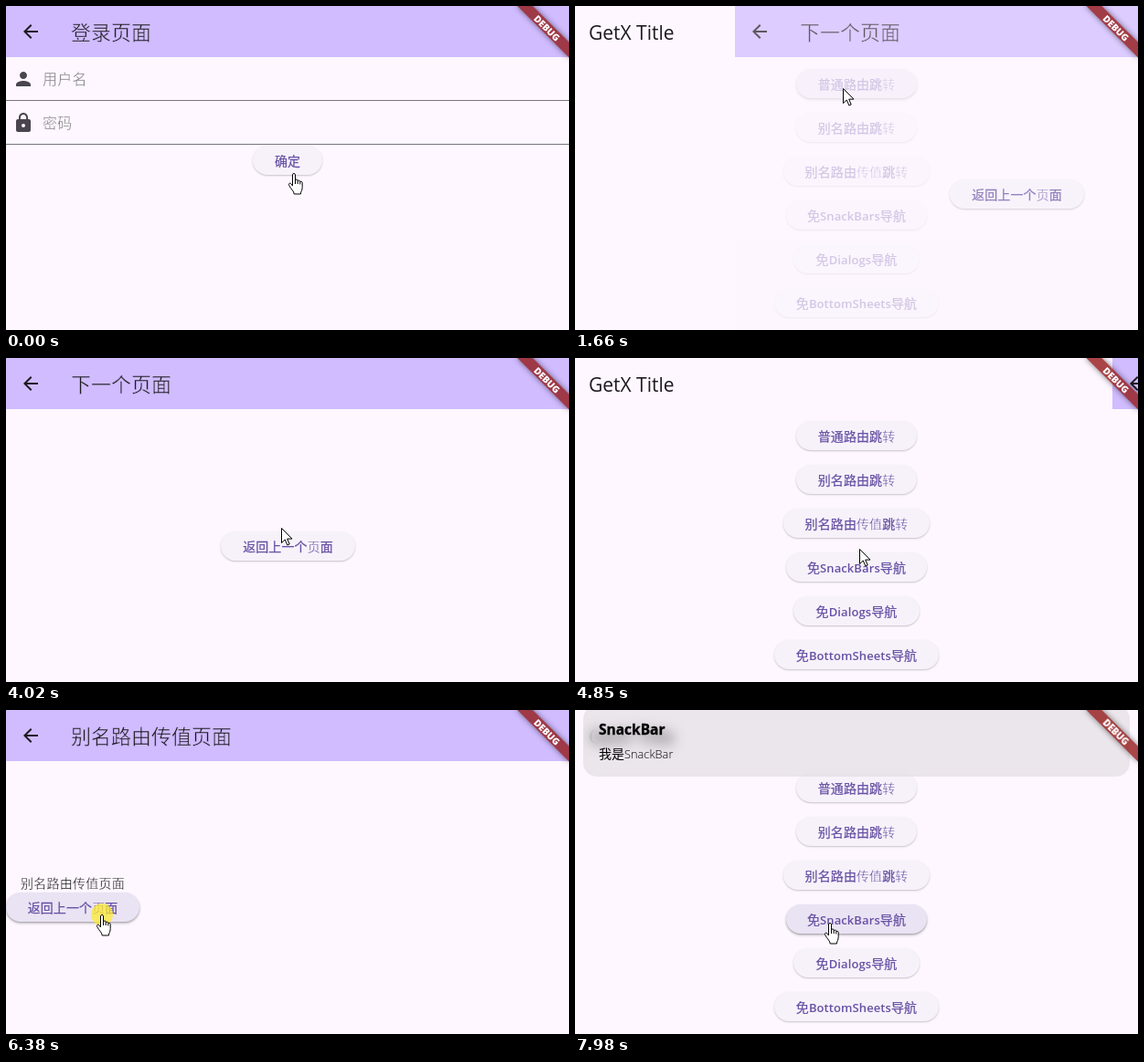
An HTML page that plays this animation: 616x355 px, repeating every 8 s.

```html
<!DOCTYPE html>
<html lang="zh-CN">
<head>
<meta charset="utf-8">
<title>Routes</title>
<style>
html, body { margin: 0; width: 100%; height: 100%; overflow: hidden; background: #fef7ff; }
#stage {
  position: relative; width: 616px; height: 355px; overflow: hidden; background: #fef7ff; color: #1d1b20;
  font: 14px "Open Sans", "Noto Sans CJK SC", "Noto Sans CJK", sans-serif; white-space: nowrap;
}
#stage div, #stage svg { position: absolute; }
.page { left: 0; top: 0; width: 616px; height: 355px; background: #fef7ff; }
.bar { left: 0; top: 0; width: 616px; height: 56px; background: #d0bcff; }
/* A stroke in the background colour thins the glyphs. */
.title { left: 71px; top: 0; font-size: 22px; line-height: 56px; font-weight: 300; -webkit-text-stroke: .5px #d0bcff; }
.home { left: 15px; top: 1px; font-size: 21px; font-weight: 400; -webkit-text-stroke: 0; }
.note { left: 16px; top: 180px; line-height: 20px; letter-spacing: .25px; -webkit-text-stroke: .3px #fef7ff; }
.ring { left: 0; top: 0; width: 56px; height: 56px; border-radius: 50%; background: rgba(29, 27, 32, .14); opacity: 0; }
.btn {
  height: 32px; line-height: 33px; border-radius: 16px; text-align: center; letter-spacing: .1px;
  color: #6750a4; background: #f7f2fa; box-shadow: 0 1px 2px rgba(0, 0, 0, .22);
  -webkit-text-stroke: .25px;
}
.btn .glow {
  inset: 0; border-radius: 16px; opacity: 0; background: rgba(103, 80, 164, .09);
  box-shadow: 0 2px 3px rgba(0, 0, 0, .18);
}
.btn b { font-weight: 600; font-size: 13px; -webkit-text-stroke: 0; }
.btn i { font-style: normal; -webkit-text-stroke: .3px #f7f2fa; }
.hint { left: 40px; font-size: 16px; line-height: 48px; letter-spacing: .3px; color: #8a858e; -webkit-text-stroke: .3px #fef7ff; }
.line { left: 0; width: 616px; height: 1px; background: #79747e; }
#snack {
  left: 9px; width: 598px; height: 78px; border-radius: 15px;
  background: rgba(158, 158, 158, .2); backdrop-filter: blur(7px);
}
#snack div { left: 17px; line-height: 20px; color: #000; }
#corner { left: 616px; top: 0; transform-origin: 0 0; transform: rotate(45deg); }
#corner div {
  left: -40px; top: 28px; width: 80px; height: 12px; text-align: center;
  font: 800 10.2px/12px "Open Sans", sans-serif; color: #fff;
  background: rgba(146, 22, 22, .79); box-shadow: 0 0 6px rgba(0, 0, 0, .5);
}
#halo { width: 24px; height: 24px; margin: -12px; border-radius: 50%; background: rgba(255, 236, 40, .72); }
#arrow, #hand { overflow: visible; fill: #fff; stroke: #000; stroke-linejoin: round; }
</style>
</head>
<body>
<div id="stage"></div>
<script>
const stage = document.getElementById('stage');
const LOOP = 8000, W = 616, SLIDE = 300;

function add(parent, cls, html = '', css = '') {
  const el = document.createElement('div');
  el.className = cls;
  el.innerHTML = html;
  el.style.cssText = css;
  return parent.appendChild(el);
}

const icon = (d, x, y, fill) =>
  `<svg width="24" height="24" style="left:${x}px;top:${y}px" fill="${fill}"><path d="${d}"/></svg>`;

// Returns the hover layer of the new button.
function button(parent, text, x, y, w) {
  const label = text.replace(/[A-Za-z]+/g, '<b>$&</b>').replace(/[转传值页]/g, '<i>$&</i>');
  const el = add(parent, 'btn', label, `left:${x}px;top:${y}px;width:${w}px`);
  return add(el, 'glow');
}

function page(title) {
  const el = add(stage, 'page');
  add(el, 'bar');
  const ring = add(el, 'ring');
  el.insertAdjacentHTML('beforeend',
    icon('M20 11H7.83l5.59-5.59L12 4l-8 8 8 8 1.41-1.41L7.83 13H20v-2z', 15, 16, '#1d1b20'));
  add(el, 'title', title);
  return { el, ring };
}

add(stage, 'title home', 'GetX Title');
const menu = [
  ['普通路由跳转', 242, 132], ['别名路由跳转', 242, 132], ['别名路由传值跳转', 228, 160],
  ['免SnackBars导航', 231, 154], ['免Dialogs导航', 239, 138], ['免BottomSheets导航', 218, 180]
].map(([text, x, w], i) => button(stage, text, x, 69 + 48 * i, w));

const next = page('下一个页面');
const nextBack = button(next.el, '返回上一个页面', 235, 190, 147);

const args = page('别名路由传值页面');
add(args.el, 'note', '别名路由传值页面');
const argsBack = button(args.el, '返回上一个页面', 0, 200, 146);

const login = page('登录页面');
login.el.insertAdjacentHTML('beforeend',
  icon('M12 12c2.21 0 4-1.79 4-4s-1.79-4-4-4-4 1.79-4 4 1.79 4 4 4zm0 2c-2.67 0-8 1.34-8 4v2h16v-2c0-2.66-5.33-4-8-4z', 7, 68, '#49454f') +
  icon('M18 8h-1V6c0-2.76-2.24-5-5-5S7 3.24 7 6v2H6c-1.1 0-2 .9-2 2v10c0 1.1.9 2 2 2h12c1.1 0 2-.9 2-2V10c0-1.1-.9-2-2-2zm-6 9c-1.1 0-2-.9-2-2s.9-2 2-2 2 .9 2 2-.9 2-2 2zm3.1-9H8.9V6c0-1.71 1.39-3.1 3.1-3.1s3.1 1.39 3.1 3.1v2z', 7, 116, '#49454f'));
['用户名', '密码'].forEach((text, i) => {
  add(login.el, 'hint', text, `top:${56 + 48 * i}px`);
  add(login.el, 'line', '', `top:${103 + 48 * i}px`);
});
const confirm = button(login.el, '确定', 270, 153, 76);

const snack = add(stage, '');
snack.id = 'snack';
add(snack, '', 'SnackBar', 'top:16px;font-size:15.5px;font-weight:700;-webkit-text-stroke:.3px');
add(snack, '', '我是<span style="font-size:12.8px">SnackBar</span>', 'top:43px;font-weight:300');

const corner = add(stage, '', '<div>DEBUG</div>');
corner.id = 'corner';

const halo = add(stage, '');
halo.id = 'halo';
stage.insertAdjacentHTML('beforeend', `
  <svg id="arrow" width="13" height="20"><path d="M.5 .5V16.6L4.3 13 6.9 19 9.2 18 6.7 12.1H12Z"/></svg>
  <svg id="hand" width="17" height="24" style="margin-left:-7px"><path d="M5.5 1.8c0-1.7 3-1.7 3 0V8c0-1.3 2.7-1.3 2.7.2V9c.2-1.3 2.6-1.1 2.6.4v.6c.3-1.1 2.4-.9 2.4.6v5c0 4-1.8 4.4-1.8 7.4H7.2c0-3-3-4.8-5.4-9.3C.8 11.4 2.6 10.3 4 12l1.5 2ZM8.5 8v4M11.2 9v3M13.8 10v2.4"/></svg>`);
const arrow = document.getElementById('arrow');
const hand = document.getElementById('hand');

// page, opens, closes, fades
const runs = [
  [login.el, -SLIDE, 480, false],
  [next.el, 1521, 2581, true],
  [next.el, 3180, 4558, false],
  [args.el, 5480, 6430, false]
];

// hover layer, enter, press, leave
const hovers = [
  [confirm, 400, 400, 800],
  [menu[0], 1080, 1450, 1830],
  [next.ring, 2150, 2480, 2900],
  [menu[1], 2930, 3110, 3500],
  [nextBack, 4080, 4450, 4880],
  [menu[2], 5060, 5410, 5800],
  [argsBack, 6120, 6250, 6740],
  [menu[3], 6930, 7080, LOOP]
];

// time ranges with the hand pointer
const hands = [[0, 480], [1080, 1520], [2150, 2560], [2930, 3180], [4080, 4560], [5060, 5480], [6120, 6480], [6930, LOOP]];

// time, x, y of the pointer
const path = [
  [0, 315, 183], [70, 315, 183], [200, 311, 164], [700, 311, 164], [1180, 293, 90], [1840, 293, 90],
  [2220, 27, 30], [2560, 27, 30], [2830, 275, 165], [2970, 290, 141], [3500, 290, 141], [4020, 301, 186],
  [4200, 311, 209], [4880, 311, 209], [5210, 300, 184], [5800, 300, 184], [6180, 105, 224],
  [6480, 105, 224], [7010, 279, 233], [LOOP, 279, 233]
];

const clamp = v => Math.min(1, Math.max(0, v));
const outQuad = v => v * (2 - v);
const outCirc = v => Math.sqrt(1 - (1 - v) ** 2);
const smooth = v => v * v * (3 - 2 * v);

function pointer(t) {
  const i = path.findIndex(k => k[0] > t);
  const [t0, x0, y0] = path[i - 1], [t1, x1, y1] = path[i];
  const p = smooth((t - t0) / (t1 - t0));
  return [x0 + (x1 - x0) * p, y0 + (y1 - y0) * p];
}

function draw(t) {
  for (const { el } of [login, next, args]) el.style.display = 'none';
  for (const [el, open, close, fade] of runs) {
    if (t < open || t >= close + SLIDE) continue;
    const v = outQuad(t < close ? clamp((t - open) / SLIDE) : 1 - clamp((t - close) / SLIDE));
    el.style.display = '';
    el.style.opacity = fade ? v : 1;
    el.style.transform = `translateX(${Math.round(W * (1 - v))}px)`;
  }

  for (const [el, enter, , leave] of hovers)
    el.style.opacity = t < leave ? clamp((t - enter) / 120) : 0;

  snack.style.top = -78 + 74 * outCirc(clamp((t - 7130) / 1000)) + 'px';
  snack.style.display = t < 7130 ? 'none' : '';

  const [x, y] = pointer(t).map(Math.round);
  for (const el of [arrow, hand, halo]) {
    el.style.left = x + 'px';
    el.style.top = y + 'px';
  }
  const onHand = hands.some(([a, b]) => t >= a && t < b);
  hand.style.display = onHand ? '' : 'none';
  arrow.style.display = onHand ? 'none' : '';
  halo.style.display = hovers.some(([, , press]) => t >= press && t < press + 190) ? '' : 'none';
}

const start = performance.now();
function tick() {
  draw((performance.now() - start) % LOOP);
  requestAnimationFrame(tick);
}
tick();
</script>
</body>
</html>
```
